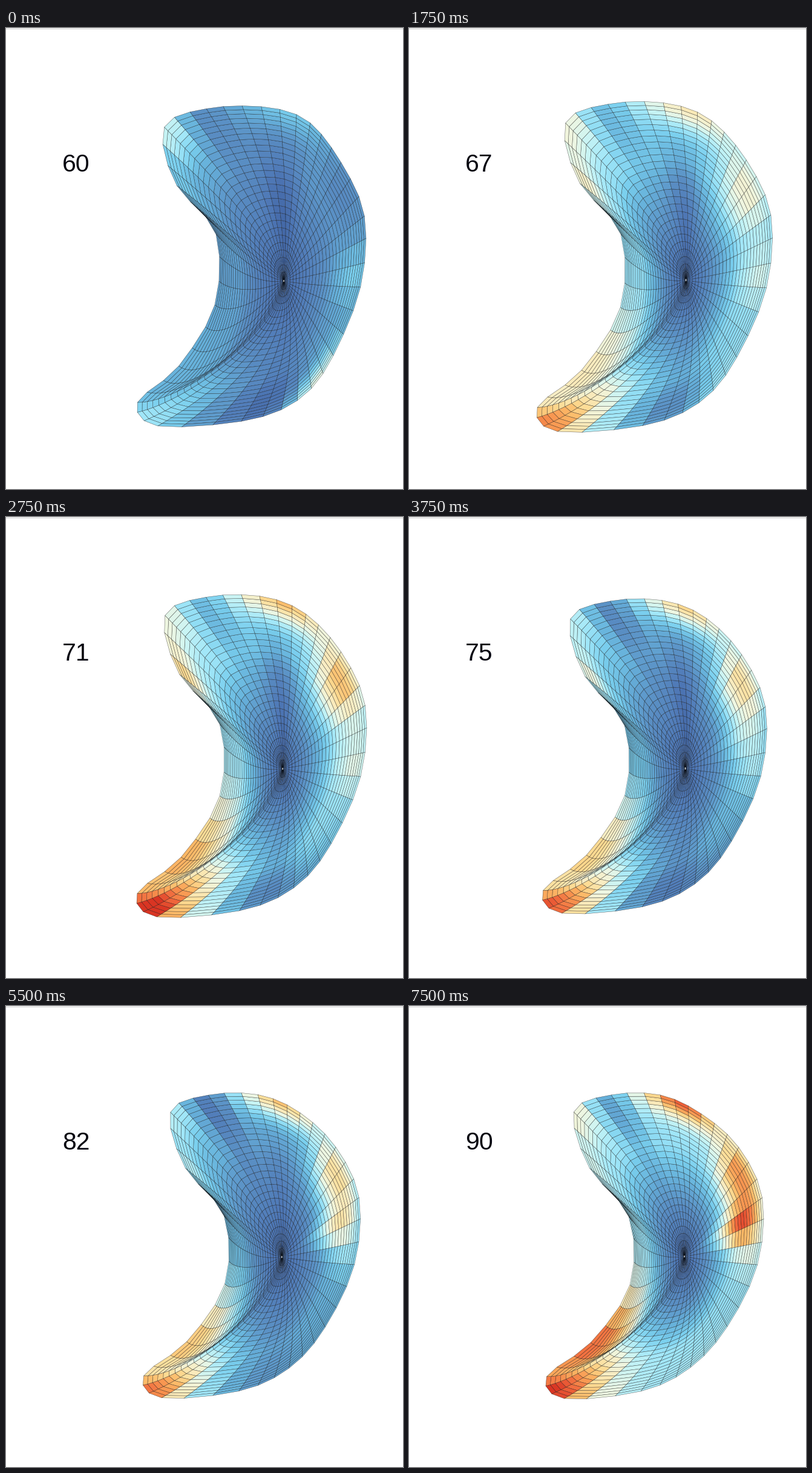
A matplotlib script that plays this animation: 656 px wide and 761 px high, repeating every 7750 ms.

```python
import numpy as np
import matplotlib.pyplot as plt
from matplotlib.animation import FuncAnimation
from matplotlib.collections import PolyCollection
from matplotlib.colors import LinearSegmentedColormap

W, H, DPI = 656, 761, 64
PX = 72 / DPI  # points per pixel
SECTORS, RINGS = 48, 27
FRAMES, STEP = 31, 250
FIRST = 60

CMAP = LinearSegmentedColormap.from_list("strain", [
    "#3c5f9f", "#4f78b6", "#5a8fc4", "#66b0da", "#7acfee", "#a0e6f8", "#c9f4f4",
    "#eef6e2", "#f8ecc0", "#fddc94", "#fcb866", "#f7924e", "#f0673c", "#d93523"])

# Every third rim point, clockwise from the right; a spline fills in the rest.
RIM_KEYS = np.array([
    (580, 428), (530, 530), (469, 597), (387, 636), (260, 648), (231, 612),
    (304, 556), (369, 461), (367, 349), (302, 269), (276, 177), (338, 149),
    (419, 149), (487, 180), (549, 235), (588, 318)], float)

# Offsets of the rim at the start, fading out: sector, width, dx, dy.
RIM_OFFSETS = [(5.5, 4, 13, 12), (21.5, 4.5, -18, -3), (28, 2.5, -8, 2),
               (38.5, 2.5, 16, -9)]

# Colour bumps: sector, radius, their widths, then strength early, midway, late.
BUMPS = [
    (13.0, 1.00, 2.2, .40, .20, .70, .62),    # horn tip
    (18.0, .95, 3.0, .40, .05, .42, .55),     # horn, inner side
    (8.0, .85, 2.5, .35, -.15, -.22, .03),    # bottom
    (4.5, 1.00, 2.2, .20, .35, -.10, .05),    # lower right
    (47.5, .85, 1.5, .25, .12, .15, .10),     # right
    (45.7, .65, 1.3, .28, 0, 0, .50),
    (43.0, .80, 2.2, .25, -.05, .40, .48),    # upper right
    (37.5, 1.00, 2.8, .18, .12, .42, .58),    # top
    (36.5, .50, 2.5, .35, -.10, -.15, 0),
    (32.8, .90, 1.2, .35, -.05, -.12, -.18),  # upper left
    (30.0, 1.00, 1.3, .25, .30, .18, .22),
    (27.5, .90, 1.3, .20, .10, .33, .12),     # inner side
]

K = np.arange(SECTORS)


def bell(x, mid, width):
    return np.exp(-((x - mid) / width) ** 2)


def sector_bell(k, mid, width):
    """Bell around the closed ring of sectors."""
    gap = (k - mid + SECTORS / 2) % SECTORS - SECTORS / 2
    return bell(gap, 0, width)


def closed_spline(keys, per):
    """Catmull-Rom points through a closed ring of keys."""
    a, b, c, d = (np.roll(keys, n, axis=0)[:, None] for n in (1, 0, -1, -2))
    u = (np.arange(per) / per)[None, :, None]
    pts = b + u * (c - a) / 2 + u**2 * (a - 2.5 * b + 2 * c - d / 2) \
        + u**3 * (1.5 * (b - c) + (d - a) / 2)
    return pts.reshape(-1, 2)


RIM = closed_spline(RIM_KEYS, SECTORS // len(RIM_KEYS))
OFFSET = sum(sector_bell(K, mid, width)[:, None] * np.array([dx, dy])
             for mid, width, dx, dy in RIM_OFFSETS)
THETA = np.radians(4 + 360 * K / SECTORS)
POLE_PULL = np.column_stack([42 * np.cos(THETA), 108 * np.sin(THETA)])
SAG = np.column_stack([0 * K, 55 * bell(K, 17.5, 3.5)])  # bow of the horn


def mesh(count):
    blend = ((count - FIRST) / (FRAMES - 1)) ** .75
    height = np.interp(count, [60, 64.5, 67, 79, 84, 90],
                       [530, 552, 546, 507, 502, 505])
    rim = RIM + (1 - blend) * OFFSET
    low, high = rim.min(axis=0), rim.max(axis=0)
    size = height * np.array([.713, 1])
    centre = np.array([406, 393.5 + 2.5 * blend])
    rim = centre + ((rim - low) / (high - low) - .5) * size

    pole = np.array([459, 417.5]) - 4 * blend
    near = pole + POLE_PULL
    far = rim + .3 * (near - rim) + SAG
    s = np.linspace(.008, 1, RINGS + 1)[:, None, None]
    r = 1 - s
    return r**3 * pole + 3 * r**2 * s * near + 3 * r * s**2 * far + s**3 * rim


def quads(grid):
    nxt = np.roll(grid, -1, axis=1)
    cells = np.stack([grid[:-1], grid[1:], nxt[1:], nxt[:-1]], axis=2)
    return cells.reshape(-1, 4, 2)


def values(count):
    k = K + .5
    s = ((np.arange(RINGS) + .5) / RINGS)[:, None]
    pulse = .23 - .09 * np.cos(2 * np.pi * (count - FIRST) / 19)
    value = .05 + pulse * np.minimum(1, s / .6) ** 1.3 + 0 * k
    for mid, radius, wk, ws, *strength in BUMPS:
        amp = np.interp(count, [60, 71, 88], strength)
        value += amp * sector_bell(k, mid, wk) * bell(s, radius, ws)
    return np.clip(value, 0, 1).ravel()


fig = plt.figure(figsize=(W / DPI, H / DPI), dpi=DPI, facecolor="white")
ax = fig.add_axes([0, 0, 1, 1])
ax.set_xlim(0, W)
ax.set_ylim(H, 0)
ax.axis("off")
ax.plot([0, W], [.5, .5], color="#c8c8c8", lw=PX, antialiased=False)

surface = PolyCollection([], edgecolors=(0, 0, 0, .6), linewidths=.5 * PX)
ax.add_collection(surface, autolim=False)
label = ax.text(93, 237, "", family="Liberation Sans", size=41 * PX,
                color="#05050f", ha="left", va="baseline")


def draw(i):
    count = FIRST + i
    surface.set_verts(quads(mesh(count)))
    surface.set_facecolor(CMAP(values(count)))
    label.set_text(str(count))
    return surface, label


anim = FuncAnimation(fig, draw, frames=FRAMES, interval=STEP,
                     repeat=True, repeat_delay=0)
plt.show()
```
